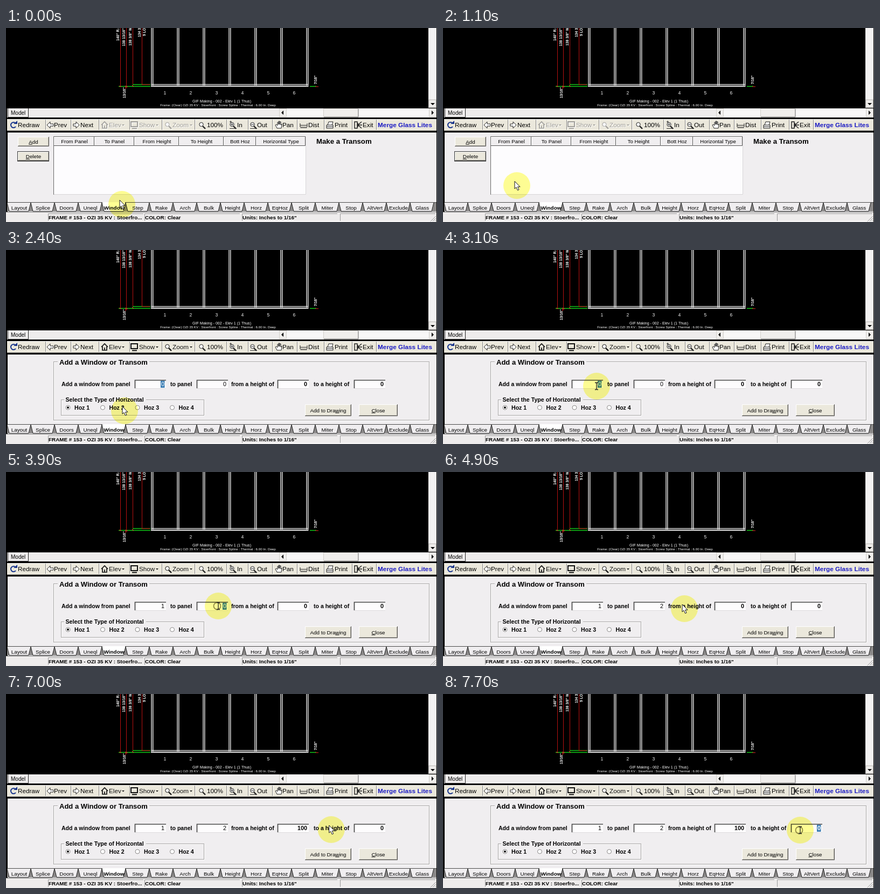
Recreate the animation shown at these times as an HTML page. Size 800 px wide and 362 px high, loop 8 s.

```html
<!DOCTYPE html>
<html lang="en">
<head>
<meta charset="utf-8">
<title>Add a transom</title>
<style>
  html, body { margin: 0; width: 100%; height: 100%; overflow: hidden; background: #000; }
  svg { display: block; width: 800px; height: 362px; }
  text { font-family: "Liberation Sans", Arial, sans-serif; white-space: pre; }
</style>
</head>
<body>
<svg id="stage" viewBox="0 0 800 362" xmlns="http://www.w3.org/2000/svg"></svg>
<script>
const svg = document.getElementById('stage');
const FACE = '#f0eef0', BAR = '#ebe8dc';

function add(parent, tag, attrs = {}, content) {
  const node = document.createElementNS('http://www.w3.org/2000/svg', tag);
  for (const key in attrs) node.setAttribute(key, attrs[key]);
  if (content !== undefined) node.textContent = content;
  parent.append(node);
  return node;
}
const group = (parent, attrs) => add(parent, 'g', attrs);
const rect = (p, x, y, width, height, fill, more) => add(p, 'rect', { x, y, width, height, fill, ...more });
const path = (p, d, stroke = '#000', more) => add(p, 'path', { d, stroke, fill: 'none', ...more });
const label = (p, x, y, text, size, more) => add(p, 'text', { x, y, 'font-size': size, ...more }, text);
const bold = { 'font-weight': 700 };
const middle = { 'text-anchor': 'middle' };
const show = (node, on) => node.setAttribute('visibility', on ? 'inherit' : 'hidden');

// Centred text in which one letter carries the access-key underline.
function keyLabel(p, x, y, text, key) {
  const node = label(p, x, y, '', 9.8, middle);
  const at = text.indexOf(key);
  add(node, 'tspan', {}, text.slice(0, at));
  add(node, 'tspan', { 'text-decoration': 'underline' }, key);
  add(node, 'tspan', {}, text.slice(at + 1));
  return node;
}

function button(p, x, y, w, h, text, key) {
  rect(p, x, y, w, h, BAR);
  path(p, `M${x + .5} ${y + h}V${y + .5}H${x + w}`, '#fff');
  path(p, `M${x} ${y + h - .5}H${x + w - .5}V${y}`, '#55534f');
  path(p, `M${x + 1} ${y + h - 1.5}H${x + w - 1.5}V${y + 1}`, '#aaa8a2');
  return keyLabel(p, x + w / 2, y + h / 2 + 3.5, text, key);
}

function etched(p, x, y, w, h) {
  rect(p, x + 1.5, y + 1.5, w, h, 'none', { stroke: '#fff' });
  rect(p, x + .5, y + .5, w, h, 'none', { stroke: '#a5a3a3' });
}

function drawModel() {
  rect(svg, 0, 0, 800, 362, '#000');
  const g = group(svg);
  for (let i = 0; i < 7; i++) {
    const x = 270 + i * 48;
    path(g, `M${x} 0V107M${x + 2.8} 0V107`, '#f0f0f0', { 'stroke-width': 1.4 });
    if (i < 6) label(g, x + 25, 124, i + 1, 8.7, { ...middle, fill: '#eee' });
  }
  path(g, 'M270 105.3H560', '#f4f4f4', { 'stroke-width': 1.3 });
  path(g, 'M269 108.5H561.5', '#fff', { 'stroke-width': 2.2 });
  path(g, 'M212.5 0V109M223.5 0V112M235.5 0V108M252.5 0V105', '#b81010');
  path(g, 'M235 105.5H268M209 109H268M564 109H576', '#10c818', { 'stroke-width': 1.6 });
  path(g, 'M252 105.5H267M222 109V114M574 109.5H580', '#d02020');
  path(g, 'M210 108L214 110M221 108L226 110M234 107L237 110', '#ff3030');
  for (const [x, y, text] of [[210, 24, '140" R.O.'], [221, 34, '138 13/16"'], [233, 33, '138 3/8" Wall'],
    [250, 17, '134 3/8"'], [259, 15, '9 LO'], [222, 131, '13/16"'], [577, 105, '7/16"']])
    label(g, 0, 0, text, 6.8, { ...bold, fill: '#fff', transform: `translate(${x} ${y}) rotate(-90)` });
  label(g, 400.5, 139, 'GIF Making - 002 - Elev 1 (1 Thus)', 7.1, { ...middle, fill: '#fff' });
  label(g, 393.5, 145.5, 'Frame: (Clear) OZI 35 KV : Stoerfront : Screw Spline : Thermal : 6.00 In. Deep',
    6.2, { ...middle, fill: '#fff' });
}

function drawScrollbars() {
  rect(svg, 784, 0, 15, 149, '#f3f2f2');
  rect(svg, 785, 134, 13, 14, '#f0eeec', { stroke: '#b5b3b0' });
  path(svg, 'M788 140H796L792 144Z', 'none', { fill: '#000' });
  rect(svg, 2, 150, 797, 17, '#eeecec');
  path(svg, 'M3.5 150V166.5H41.5V150', '#222');
  label(svg, 9, 162, 'Model', 10);
  rect(svg, 507, 150, 292, 16, '#f8f7f7');
  for (const x of [507.5, 785.5]) rect(svg, x, 150.5, 13, 15, '#f0eeec', { stroke: '#d2d0cc' });
  path(svg, 'M515 154V162L511 158ZM790 154V162L794 158Z', 'none', { fill: '#000' });
  rect(svg, 589.5, 150.5, 64, 15, '#f0eeec', { stroke: '#d2d0cc' });
  path(svg, 'M590 166H654V151', '#777');
}

const lens = (p, x) => {
  path(p, `M${x + 7} 183L${x + 12} 188`, 'currentColor', { 'stroke-width': 2.4 });
  add(p, 'circle', { cx: x + 4.5, cy: 180, r: 3.7, fill: '#f7f7f7', stroke: 'currentColor' });
};

const menuGroups = [];
function drawToolbar() {
  rect(svg, 2, 170, 797, 22, BAR);
  path(svg, 'M2 170.5H799', '#fff');
  path(svg, 'M2 191.5H799', '#8b8986');
  for (const x of [73, 120, 172, 229, 289, 350, 409, 449, 494, 540, 590, 642, 687]) {
    path(svg, `M${x + .5} 171V190`, '#85837f');
    path(svg, `M${x + 1.5} 171V190`, '#fff');
  }
  const items = [[22, 'Redraw'], [89, 'Prev'], [138, 'Next'], [373, '100%'], [429, 'In'], [466, 'Out'],
    [513, 'Pan'], [561, 'Dist'], [610, 'Print'], [662, 'Exit']];
  for (const [x, text] of items) label(svg, x, 185, text, 11.7);
  label(svg, 690, 184.5, 'Merge Glass Lites', 11.8, { ...bold, fill: '#1c1cc4' });

  const icons = group(svg, { color: '#222' });
  path(icons, 'M18 178A5 5 0 1 0 18 184', '#18358c', { 'stroke-width': 2 });
  path(icons, 'M14 179H21V173Z', 'none', { fill: '#18358c' });
  path(icons, 'M76 181L82 175V179H88V183H82V187Z', '#222', { fill: '#fff' });
  path(icons, 'M136 181L130 175V179H125V183H130V187Z', '#222', { fill: '#fff' });
  lens(icons, 358);
  for (const x of [415, 453]) {
    lens(icons, x);
    path(icons, `M${x} 187.5H${x + 13}M${x + 2} 180H${x + 7}`, '#333');
  }
  path(icons, 'M417 173V177M415 175H419M419.5 177.5V182.5', '#333');
  path(icons, 'M503 187L500 181L502 180L504 182V176H506V180V174H508V180V175H510V181L512 179L511 187Z', '#222', { fill: '#fff' });
  path(icons, 'M546 178V185M559 178V185M546 181.5H559', '#222');
  path(icons, 'M547 185.5H559', '#222', { 'stroke-dasharray': '1 1', 'stroke-width': 3 });
  path(icons, 'M595 181H607V187H595ZM597 181L599 175H607L605 181M595 184H607', '#222', { fill: '#f8f8f8' });
  path(icons, 'M647 175H652V187H647ZM660 175L653 181L660 187M653 181H661M653 177V185', '#222', { 'stroke-width': 1.4 });

  for (const shift of [1, 0]) {
    const g = group(svg, { transform: `translate(${shift} ${shift})`, color: '#fff' });
    menuGroups.push(g);
    path(g, 'M177 181L183 175L189 181M179 180V187H187V180M183 187V182', 'currentColor', { 'stroke-width': 1.7 });
    rect(g, 232, 175, 12, 9, 'none', { stroke: 'currentColor', 'stroke-width': 2 });
    path(g, 'M234 187.5H243', 'currentColor', { 'stroke-width': 2 });
    lens(g, 295);
    for (const [x, text, tip] of [[191, 'Elev', 215], [247, 'Show', 278], [309, 'Zoom', 341]]) {
      label(g, x, 185, text, 11.7, { fill: 'currentColor' });
      path(g, `M${tip} 180H${tip + 5}L${tip + 2.5} 182.5Z`, 'none', { fill: 'currentColor' });
    }
  }
}

function drawPanelFrame() {
  rect(svg, 3, 195, 796, 167, FACE);
  path(svg, 'M2 326H799', '#111', { 'stroke-width': 1.4 });
  rect(svg, 2, 326, 797, 16, '#8a8888');
  const names = ['Layout', 'Splice', 'Doors', 'Uneql', 'Window', 'Step', 'Rake', 'Arch', 'Bulk', 'Height', 'Horz',
    'EqHoz', 'Split', 'Miter', 'Stop', 'AltVert', 'Exclude', 'Glass'];
  names.forEach((name, i) => {
    const x = 2 + i * 44, active = name === 'Window';
    path(svg, `M${x} 326L${x + 4} 342H${x + 40}L${x + 44} 326`, '#222', { fill: active ? '#fff' : FACE });
    if (active) path(svg, `M${x + 1} 326H${x + 43}`, '#fff', { 'stroke-width': 2 });
    label(svg, x + 22.5, 338.5, name, 9.9, active ? { ...middle, ...bold } : middle);
  });
  path(svg, 'M0 343.5H799', '#777');
  rect(svg, 0, 344, 799, 18, '#eeecec');
  [[78, 'FRAME # 153 - OZI 35 KV : Stoerfro...'], [257, 'COLOR: Clear'], [438, 'Units: Inches to 1/16"'], [620, '']]
    .forEach(([x, text]) => {
      path(svg, `M${x + .5} 360V346.5H${x + 177}`, '#999');
      label(svg, x + 1, 356.5, text, 9.9, bold);
    });
  path(svg, 'M78 360.5H798', '#fff');
  path(svg, 'M788 361L798 351M792 361L798 355M796 361L798 359', '#999');
}

let addLabel, addCover;
function drawList() {
  const g = group(svg);
  addLabel = button(g, 22, 203, 58, 18, 'Add', 'A');
  addCover = path(g, 'M22.5 221V203.5H80', '#777');
  button(g, 22, 231, 58, 17, 'Delete', 'D');
  rect(g, 21.5, 230.5, 58, 18, 'none', { stroke: '#333' });
  rect(g, 89, 203, 467, 107, '#fdfcfe');
  path(g, 'M88.5 311V202.5H556', '#666');
  path(g, 'M89 310.5H556.5V203', '#d8d6d8');
  const edges = [89, 164, 238, 321, 404, 464, 556];
  ['From Panel', 'To Panel', 'From Height', 'To Height', 'Bott Hoz', 'Horizontal Type'].forEach((name, i) => {
    const x = edges[i], w = edges[i + 1] - x;
    rect(g, x, 203, w, 16, FACE);
    path(g, `M${x} 219.5H${x + w - .5}V203`, '#555');
    path(g, `M${x + .5} 219V203.5H${x + w - 1}`, '#fff');
    label(g, x + w / 2 + .5, 215, name, 9.6, middle);
  });
  label(g, 576, 216, 'Make a Transom', 13.2, bold);
  return g;
}

const fields = [];
function drawDialog() {
  const g = group(svg);
  etched(g, 88, 208, 697, 109);
  rect(g, 96, 203, 170, 12, FACE);
  label(g, 99, 213.5, 'Add a Window or Transom', 13, bold);
  for (const [x, text] of [[103, 'Add a window from panel'], [305, 'to panel'], [418, 'from a height of'], [571, 'to a height of']])
    label(g, x, 254, text, 10.55, bold);
  [239, 354, 504, 646].forEach((x, i) => {
    rect(g, x, 242, 58, 16, '#fdfcfd');
    path(g, `M${x + .5} 258V243H${x + 58}`, '#4a4a4a', { 'stroke-width': 1.7 });
    path(g, `M${x} 258.5H${x + 58}`, '#dcdadc');
    const select = rect(g, x + 48, 244, 7.5, 13, '#3a7db4');
    const value = label(g, x + 55, 254, '0', 10.8, { 'text-anchor': 'end', 'font-weight': i > 1 ? 700 : 400 });
    const caret = path(g, `M${x + 56.5} 244V257`);
    fields.push({ select, value, caret });
  });
  etched(g, 102, 279, 265, 29);
  rect(g, 108, 275, 152, 10, FACE);
  label(g, 110.5, 283, 'Select the Type of Horizontal', 10.65, bold);
  for (let i = 0; i < 4; i++) {
    const x = 115 + i * 64.5;
    add(g, 'circle', { cx: x, cy: 294, r: 4, fill: '#fff', stroke: '#8a8888' });
    if (!i) add(g, 'circle', { cx: x, cy: 294, r: 1.9 });
    label(g, x + 12, 297.5, `Hoz ${i + 1}`, 10.6, bold);
  }
  button(g, 555, 288, 86, 22, 'Add to Drawing', 'w');
  button(g, 655, 288, 72, 22, 'Close', 'C');
  return g;
}

drawModel();
drawScrollbars();
drawToolbar();
drawPanelFrame();
const list = drawList();
const dialog = drawDialog();

const pointer = group(svg);
pointer.style.mixBlendMode = 'multiply';
add(pointer, 'circle', { r: 25, fill: '#ffff94' });
const cursor = group(svg);
const ring = add(cursor, 'circle', { r: 6.5, fill: 'none', stroke: '#6c6428', 'stroke-width': 1.8, 'stroke-opacity': .75 });
const arrow = path(cursor, 'M-4 -8V6L-1 3.2L1.5 8.8L4 7.7L1.6 2.3H6Z', '#111', { fill: '#fff' });
const beam = path(cursor, 'M-3 -6.5H-1L0 -5.5L1 -6.5H3M0 -5.5V5.5M-3 6.5H-1L0 5.5L1 6.5H3', '#222', { 'stroke-width': 1.3 });

// Time and centre of the pointer highlight.
const route = [[0, 215, 329], [100, 215, 329], [300, 225, 332], [700, 219, 333], [900, 219, 333], [1000, 190, 318],
  [1100, 137, 294], [1200, 112, 268], [1400, 82, 235], [1700, 71, 222], [2100, 71, 222], [2400, 220, 300],
  [2700, 360, 325], [3000, 290, 258], [3100, 285, 254], [3600, 285, 250], [3900, 394, 250], [4400, 394, 250],
  [4900, 448, 255], [5300, 533, 247], [5500, 538, 248], [6500, 538, 248], [7200, 630, 255], [7500, 663, 254], [8000, 663, 254]];
const within = (t, spans) => spans.some(([from, to]) => t >= from && t < to);
const typing = [[3500, 3700], [4200, 4500], [6000, 6600]];
const overField = [[3000, 3700], [3800, 4500], [5200, 6600], [7300, 8000]];
const clicks = [[300, 500], [1900, 2100], [3000, 3100], [3900, 4100], [5500, 5700], [7600, 8000]];
const selections = [[[2100, 3500]], [[3900, 4200]], [[5600, 6000]], [[7600, 8000]]];

function locate(t) {
  const i = Math.max(1, route.findIndex(stop => stop[0] >= t));
  const [t0, x0, y0] = route[i - 1], [t1, x1, y1] = route[i];
  const k = (t - t0) / (t1 - t0);
  return [x0 + (x1 - x0) * k, y0 + (y1 - y0) * k];
}

function render(t) {
  const open = t >= 2100, pressed = within(t, [[1900, 2100]]);
  show(list, !open);
  show(dialog, open);
  show(addCover, pressed && !open);
  addLabel.setAttribute('transform', pressed ? 'translate(1 1)' : '');
  show(menuGroups[0], !open);
  menuGroups[1].setAttribute('color', open ? '#111' : '#a09e99');

  const values = [t < 3500 ? '0' : '1', t < 4200 ? '0' : '2',
    t < 6000 ? '0' : t < 6400 ? '1' : t < 6500 ? '10' : '100', '0'];
  fields.forEach(({ select, value, caret }, i) => {
    const selected = open && within(t, selections[i]);
    show(select, selected);
    show(caret, open && i === 2 && within(t, [[6000, 6600]]));
    value.textContent = values[i];
    value.setAttribute('fill', selected ? '#fff' : '#000');
  });

  const [x, y] = locate(t), visible = !within(t, typing), text = within(t, overField);
  for (const node of [pointer, cursor]) {
    node.setAttribute('transform', `translate(${x.toFixed(1)} ${y.toFixed(1)})`);
    show(node, visible);
  }
  show(arrow, visible && !text);
  show(beam, visible && text);
  show(ring, visible && within(t, clicks));
  ring.setAttribute('transform', text ? 'translate(-2 0)' : 'translate(-4 -8)');
}

const start = performance.now();
function tick(now) {
  const t = Math.max(0, now - start) % 8000;
  render(Math.floor(t / 100) * 100);
  requestAnimationFrame(tick);
}
render(0);
requestAnimationFrame(tick);
</script>
</body>
</html>
```
